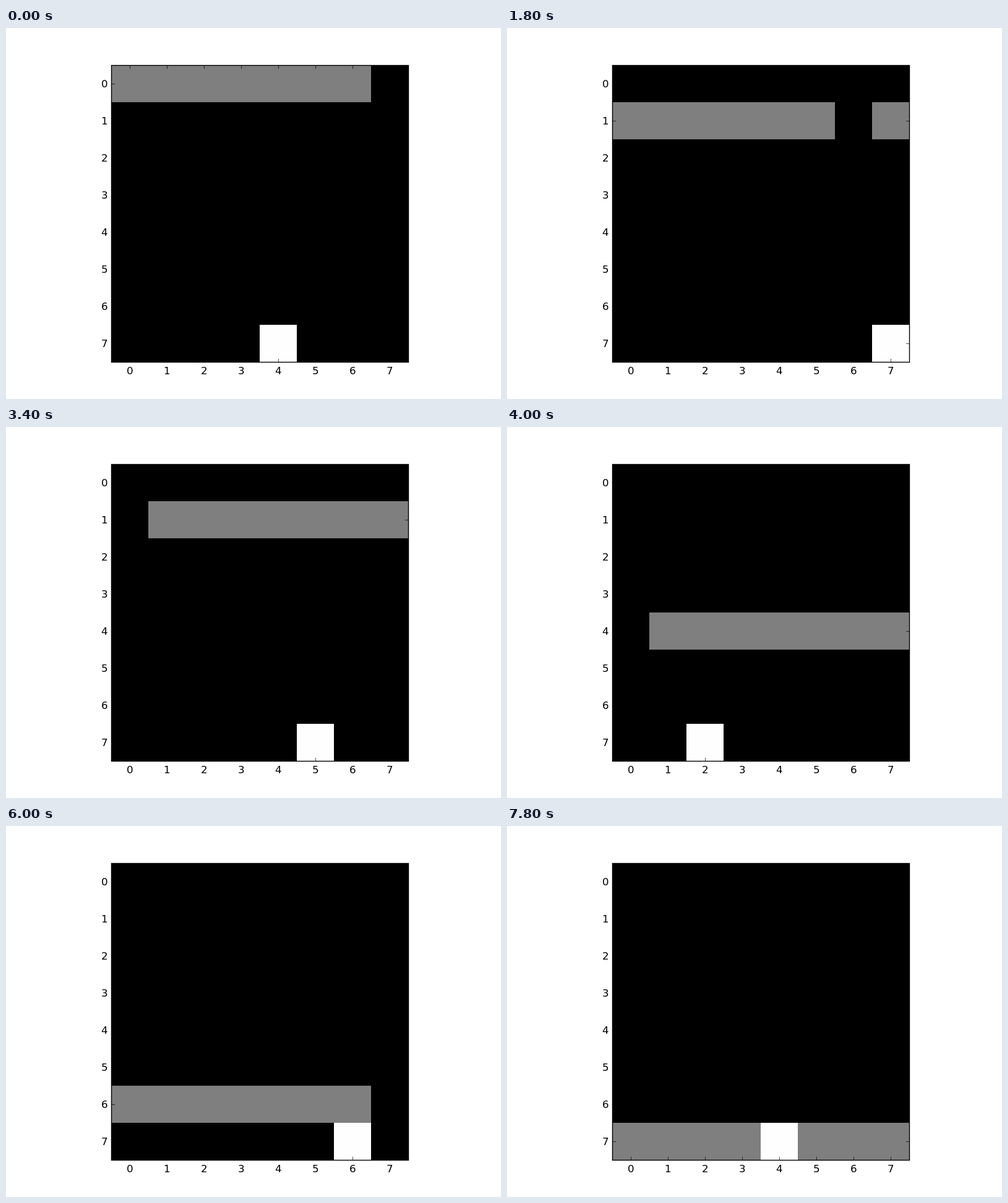
An HTML page with a canvas that plays this animation: 800x600 px, repeating every 8 s.

```html
<!DOCTYPE html>
<html>
<head>
<meta charset="utf-8">
<style>
  html, body { margin: 0; width: 100%; height: 100%; overflow: hidden; background: #fff; }
  canvas { display: block; }
</style>
</head>
<body>
<canvas id="stage" width="800" height="600"></canvas>
<script>
const ctx = document.getElementById('stage').getContext('2d');
const LEFT = 170, TOP = 60, CELL = 60, COUNT = 8, SIZE = CELL * COUNT;
const STEP_MS = 200;

// One falling wall per round: the player walks to its gap after `wait` rows.
const rounds = [
  { from: 4, gap: 7, wait: 0 },
  { from: 7, gap: 6, wait: 5 },
  { from: 6, gap: 0, wait: 0 },
  { from: 0, gap: 7, wait: 0 },
  { from: 7, gap: 4, wait: 0 },
];

function playerColumn({ from, gap, wait }, row) {
  const distance = gap - from;
  const walked = Math.min(Math.abs(distance), Math.max(0, row - wait));
  return from + Math.sign(distance) * walked;
}

function fillCell(column, row, color) {
  ctx.fillStyle = color;
  ctx.fillRect(LEFT + column * CELL, TOP + row * CELL, CELL, CELL);
}

function line(x1, y1, x2, y2) {
  ctx.beginPath();
  ctx.moveTo(x1, y1);
  ctx.lineTo(x2, y2);
  ctx.stroke();
}

function drawAxes() {
  const x0 = LEFT + 0.5, y0 = TOP + 0.5, x1 = x0 + SIZE, y1 = y0 + SIZE, tick = 5.56;
  ctx.strokeStyle = ctx.fillStyle = '#000';
  ctx.lineWidth = 1.39;
  ctx.strokeRect(x0, y0, SIZE, SIZE);
  ctx.lineWidth = 0.69;
  ctx.font = '16.67px "DejaVu Sans", sans-serif';
  ctx.textAlign = 'center';
  for (let i = 0; i < COUNT; i++) {
    const offset = (i + 0.5) * CELL;
    const x = x0 + offset, y = y0 + offset;
    line(x, y0, x, y0 + tick);
    line(x, y1, x, y1 - tick);
    line(x0, y, x0 + tick, y);
    line(x1, y, x1 - tick, y);
    ctx.fillText(i, x - 0.3, 560);
    ctx.fillText(i, 159.2, y + 5);
  }
}

function draw(step) {
  const round = rounds[Math.floor(step / COUNT)];
  const row = step % COUNT;
  ctx.fillStyle = '#fff';
  ctx.fillRect(0, 0, 800, 600);
  ctx.fillStyle = '#000';
  ctx.fillRect(LEFT, TOP, SIZE, SIZE);
  for (let column = 0; column < COUNT; column++) {
    if (column !== round.gap) fillCell(column, row, '#7f7f7f');
  }
  fillCell(playerColumn(round, row), COUNT - 1, '#fefefe');
  drawAxes();
}

function animate() {
  draw(Math.floor(performance.now() / STEP_MS) % (rounds.length * COUNT));
  requestAnimationFrame(animate);
}
animate();
</script>
</body>
</html>
```
